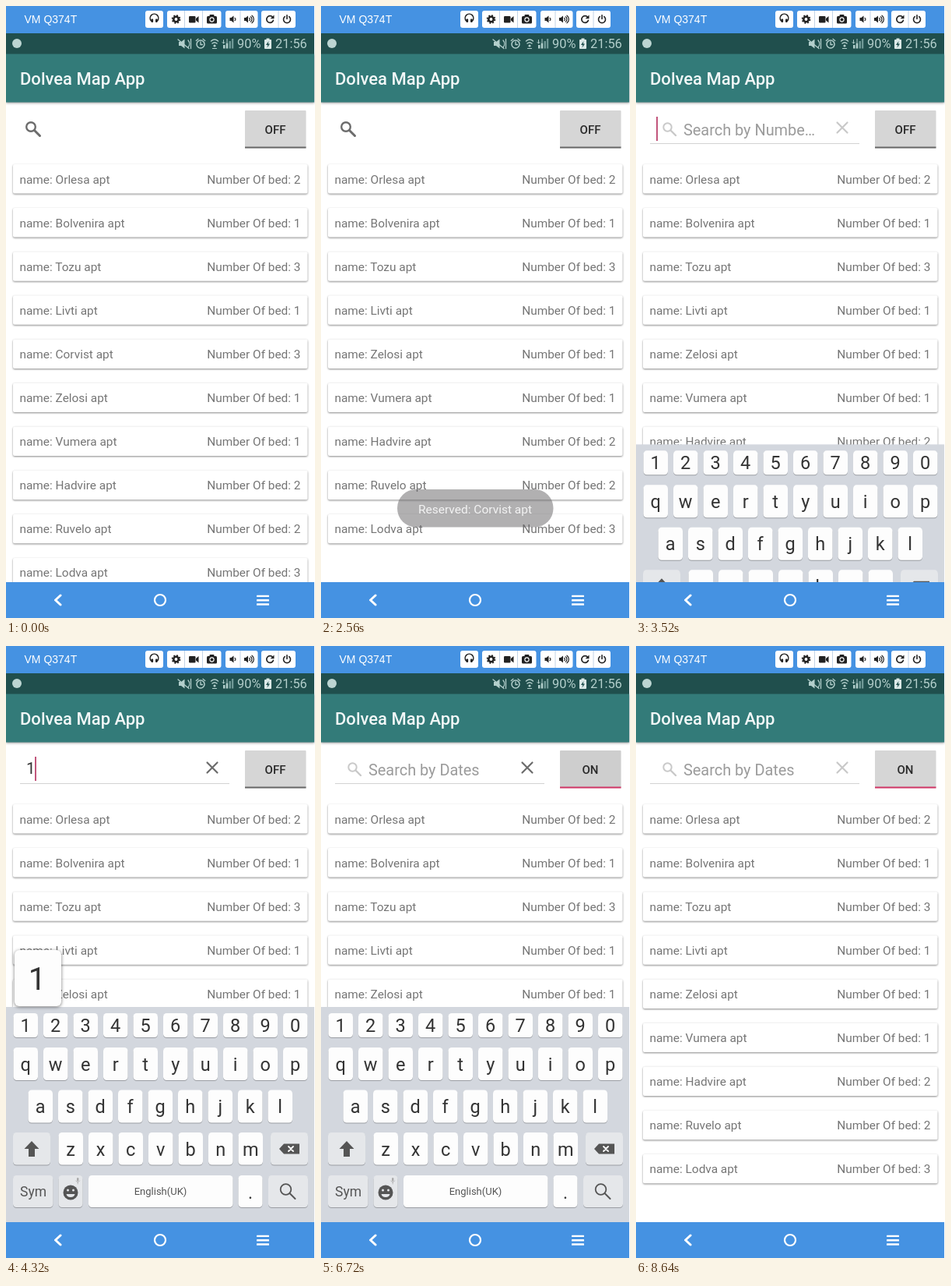
Recreate the animation shown at these times as an HTML page. Size 397 by 785 pixels, loop 9120 ms.

```html
<!DOCTYPE html>
<html lang="en">
<head>
<meta charset="utf-8">
<title>Apartment list</title>
<style>
html, body { margin: 0; width: 100%; height: 100%; overflow: hidden; background: #fff; }
svg { display: block; width: 100vw; height: 100vh; font-family: Roboto, sans-serif; }
.card { fill: #fff; filter: drop-shadow(0 1px 1.2px #0007); }
.row { fill: #757575; font-size: 15.4px; }
.key { filter: drop-shadow(0 1px .6px #0004); }
.line { fill: none; stroke-linecap: round; stroke-linejoin: round; }
.mid { text-anchor: middle; }
</style>
</head>
<body>
<svg id="stage" viewBox="0 0 397 785" xmlns="http://www.w3.org/2000/svg"></svg>
<script>
const LOOP = 9120, STEP = 160, PITCH = 56.1, GONE = 4, BOARD = 276;
const flats = [['Orlesa', 2], ['Bolvenira', 1], ['Tozu', 3], ['Livti', 1], ['Corvist', 3],
  ['Zelosi', 1], ['Vumera', 1], ['Hadvire', 2], ['Ruvelo', 2], ['Lodva', 3]];

const rect = (x, y, w, h, fill, r = 0, more = '') =>
  `<rect x="${x}" y="${y}" width="${w}" height="${h}" rx="${r}" fill="${fill}" ${more}/>`;
const text = (x, y, size, fill, str, more = '') =>
  `<text x="${x}" y="${y}" font-size="${size}" fill="${fill}" ${more}>${str}</text>`;
const line = (d, color, w, more = '') =>
  `<path class="line" d="${d}" stroke="${color}" stroke-width="${w}" ${more}/>`;
const shape = (d, fill) => `<path d="${d}" fill="${fill}"/>`;
const ring = (x, y, r, color, w, more = '') =>
  `<circle cx="${x}" cy="${y}" r="${r}" fill="none" stroke="${color}" stroke-width="${w}" ${more}/>`;
const dot = (x, y, r, fill) => `<circle cx="${x}" cy="${y}" r="${r}" fill="${fill}"/>`;
const group = (id, body) => `<g id="${id}">${body}</g>`;
const MID = 'class="mid"';

function cards() {
  return flats.map(([name, beds], i) => group('row' + i,
    `<rect class="card" x="9" y="203" width="378.5" height="37.5" rx="2"/>` +
    `<text class="row" x="17.5" y="227.5">name: ${name} apt</text>` +
    `<text class="row" x="378.5" y="227.5" text-anchor="end">Number Of bed: ${beds}</text>`)).join('');
}

function search() {
  return group('closed', ring(32, 155, 5.8, '#6c6c6c', 2.4) + line('M37 160L43.5 166.5', '#6c6c6c', 3)) +
    group('open',
      rect(18, 176, 269, 1, '#d2d2d2') +
      group('hint', ring(40.5, 155.5, 5.2, '#c9c9c9', 2) + line('M45 160L51 166', '#c9c9c9', 2.4) +
        text(61, 165.5, 19.9, '#9b9b9b', '', 'id="hintText"')) +
      text(26, 164, 20.5, '#333', '1', 'id="query"') +
      line('M258.5 149.5L271.5 162.5M271.5 149.5L258.5 162.5', '#c9c9c9', 2.2, 'id="cross"') +
      rect(26, 142, 2, 31, '#c2567c', 0, 'id="cursor"')) +
    rect(307, 134, 78.5, 48, '#d6d6d6', 1, 'id="button"') +
    rect(307, 180.5, 78.5, 2, '#666', 0, 'id="mark"') +
    text(346, 164, 15, '#2a2a2a', 'OFF', 'id="label" class="mid" font-weight="500"');
}

function keyboard() {
  const key = (x, y, w, h, fill = '#fdfdfd') => rect(x, y, w, h, fill, 4.5, 'class="key"');
  const rows = [['1234567890', 9.5, 471, 31, 495], ['qwertyuiop', 9.5, 515, 42, 545],
    ['asdfghjkl', 28.5, 569.5, 42, 599], ['zxcvbnm', 67.5, 624, 41.5, 653.5]];
  let out = rect(0, 463, 396, BOARD, '#d3d7de');
  for (const [chars, x, y, h, base] of rows)
    [...chars].forEach((c, i) => {
      const left = x + i * 38.5;
      out += key(left, y, 31.5, h) + text(left + 15.7, base, 23.5, '#333', c, MID);
    });
  const grey = '#e5e7ea', ink = '#555';
  out += key(9, 624, 48, 41.5, grey) + key(340, 624, 48, 41.5, grey) +
    key(9, 679, 51.5, 41, grey) + key(67.5, 679, 31, 41, grey) +
    key(106, 679, 185.5, 41) + key(298.5, 679, 31, 41) + key(337, 679, 51, 41, grey);
  out += shape('M33 635L42.5 645H37V655H29V645H23.5Z', ink) +
    shape('M351 645L357 638.5H377V651.5H357Z', ink) + line('M363 642L369 648M369 642L363 648', '#fff', 1.8);
  out += text(35, 706, 17.5, ink, 'Sym', MID) + text(198.5, 704, 13, ink, 'English(UK)', MID) +
    text(314, 709, 23, '#333', '.', MID);
  out += dot(83, 701, 9.5, ink) + dot(79.5, 698, 1.5, grey) + dot(86.5, 698, 1.5, grey) +
    shape('M77.5 703H88.5A5.6 5 0 0 1 77.5 703Z', grey) +
    rect(91, 682, 2.4, 4.5, '#aaa', 1.2) + line('M89.8 686Q92.2 689.5 94.6 686M92.2 688V690', '#aaa', .8);
  return out + ring(359.5, 697, 6.8, ink, 1.8) + line('M364.5 702L371.5 709', ink, 2);
}

function deviceBar() {
  const ink = '#222';
  let out = rect(0, 0, 396, 35, '#4592e2') +
    text(23.5, 22, 14, '#fff', 'VM Q374T', 'font-family="Liberation Sans, Arial, sans-serif"');
  for (const [x, w] of [[179, 23], [207, 69.5], [282, 41.5], [328, 44]]) out += rect(x, 6, w, 22, '#fff', 3);
  for (const x of [229, 252, 300.5, 349.5]) out += rect(x, 6, 1, 22, '#c4d4e6');
  // headset, gear, video, camera
  out += line('M186.5 19A5.3 5.3 0 1 1 194.5 19', ink, 1.6) + rect(186.5, 16.5, 2.6, 4.5, ink, 1) +
    rect(192, 16.5, 2.6, 4.5, ink, 1) +
    ring(218.5, 17, 3.2, ink, 2.6) + ring(218.5, 17, 4.9, ink, 1.8, 'stroke-dasharray="1.95 1.9"') +
    rect(235, 13, 8.5, 8.5, ink, 1.2) + shape('M244 16L247.5 13V21.5L244 18.5Z', ink) +
    rect(258, 13, 13, 9.5, ink, 1.5) + rect(261.5, 11, 6, 4, ink, 1) + ring(264.5, 17.5, 2.6, '#fff', 1.1);
  // volume, reload, power
  for (const x of [287.5, 306]) out += shape(`M${x} 15H${x + 2}L${x + 5} 12.5V21.5L${x + 2} 19H${x}Z`, ink) +
    line(`M${x + 6.6} 15.4A2 2 0 0 1 ${x + 6.6} 18.6`, ink, 1.2);
  return out + line('M314.3 13.8A4 4 0 0 1 314.3 20.2M316 12.2A6 6 0 0 1 316 21.8', ink, 1.2) +
    line('M342.6 14.2A4.4 4.4 0 1 0 343.4 18.5', ink, 1.7) + shape('M344.5 11.5V16.3H339.6Z', ink) +
    line('M358.2 13.6A4.5 4.5 0 1 0 363.8 13.6M361 11.8V16.5', ink, 1.6);
}

function appBar() {
  const pale = '#b3cfcc';
  return rect(0, 61, 396, 62.5, '#337b79', 0, 'style="filter:drop-shadow(0 1.5px 1.5px #0006)"') +
    rect(0, 35, 396, 26.5, '#204f4d') + dot(14, 48, 6, '#bcd5d2') +
    text(18, 101, 22, '#f2f7f7', 'Dolvea Map App', 'font-weight="500"') +
    // muted, alarm, wifi, signal, battery
    shape('M222 46H225L229.5 42.5V54.5L225 51H222Z', pale) +
    line('M221 43L235 54.5M234 44A7 7 0 0 1 234 53M237.5 42.5V54.5', pale, 1.3) +
    ring(250, 49, 5, pale, 1.5) + line('M250 46V49.5H252.5M244.3 44.5L247 42.3M255.7 44.5L253 42.3', pale, 1.3) +
    line('M263.5 45Q268 41 272.5 45M265 48Q268 45.3 271 48', pale, 1.4) + dot(268, 51, 1.6, pale) +
    line('M265.5 54.5H270.5', pale, 1.2) +
    shape('M279 54.5V50H281.5V54.5ZM282.7 54.5V47.5H285.2V54.5Z', pale) +
    shape('M286.5 54.5V45H289V54.5ZM290 54.5V42H292.3V54.5Z', '#6f9896') +
    line('M279.5 43.5V48M278 46.5L279.5 48L281 46.5M284 47V42.5', pale, 1) +
    rect(332, 43, 9, 12, '#dbe9e7', 1) + rect(334.5, 41.5, 4, 2, '#dbe9e7') +
    shape('M337.5 45L334 50H336.3L335.5 53.5L339 48.5H336.8Z', '#204f4d') +
    text(297, 54, 16.4, pale, '90%') + text(346, 54, 16.4, pale, '21:56');
}

function navBar() {
  return rect(0, 739, 396, 46, '#4592e2') + line('M70 756L63.5 762L70 768', '#fff', 3) +
    ring(198, 762, 7, '#fff', 2.2) + [755.7, 761, 766.3].map(y => rect(322, y, 16, 2.4, '#fff', .5)).join('');
}

document.getElementById('stage').innerHTML =
  rect(0, 0, 397, 785, '#fff') + cards() + search() + group('board', keyboard()) +
  group('popup', rect(11, 390, 60, 72, '#fdfdfd', 6, 'style="filter:drop-shadow(0 1px 2px #0008)"') +
    text(40, 441, 40, '#333', '1', MID)) +
  group('toast', rect(98, 620, 200.5, 48.5, '#656366', 24) +
    text(198, 651, 15.5, '#e8e8e8', `Reserved: ${flats[GONE][0]} apt`, MID)) +
  navBar() + appBar() + deviceBar();

const $ = id => document.getElementById(id);
const set = (id, name, value) => $(id).setAttribute(name, value);
const show = (id, on) => set(id, 'opacity', +on);
const ramp = (t, a, b) => Math.min(1, Math.max(0, (t - a) / (b - a)));
const within = (t, a, b) => t >= a && t < b;

function drawRows(t) {
  const filtered = within(t, 5760, 6720);
  const p = ramp(t, 880, 1240), slide = p * p * (3 - 2 * p);
  let slot = 0;
  flats.forEach(([, beds], i) => {
    let place = i > GONE ? i - slide : i, alpha = i === GONE ? 1 - ramp(t, 720, 960) : 1;
    if (filtered) {
      alpha = +(beds === 1);
      if (alpha) place = slot++;
    }
    set('row' + i, 'transform', `translate(0 ${place * PITCH})`);
    show('row' + i, alpha);
  });
}

function draw(t) {
  drawRows(t);
  show('toast', ramp(t, 960, 1280) * (1 - ramp(t, 2240, 2880)));

  const open = t >= 3200, typed = within(t, 4320, 6720), on = t >= 6400;
  show('closed', !open);
  show('open', open);
  show('hint', !typed);
  show('query', typed);
  $('hintText').textContent = on ? 'Search by Dates' : 'Search by Numbe…';
  set('cross', 'stroke', within(t, 4320, 6880) ? '#6c6c6c' : '#c9c9c9');

  // the blink restarts with each edit
  const edit = t >= 6880 ? 6880 : t >= 4320 ? 4320 : 3200;
  show('cursor', t < 8320 && Math.floor((t - edit) / 480) % 2 === 0);
  set('cursor', 'x', typed ? 37 : 26);

  $('label').textContent = on ? 'ON' : 'OFF';
  set('mark', 'fill', on ? '#cf3565' : '#666');
  set('button', 'fill', within(t, 6240, 7040) ? '#cecece' : '#d6d6d6');

  const rise = (1 - ramp(t, 3440, 3640)) ** 2, fall = ramp(t, 8280, 8600) ** 2;
  set('board', 'transform', `translate(0 ${BOARD * Math.max(rise, fall)})`);
  show('popup', within(t, 4160, 4480));
}

const start = performance.now();
function tick() {
  const t = (performance.now() - start) % LOOP;
  draw(Math.floor(t / STEP) * STEP);
  requestAnimationFrame(tick);
}
tick();
</script>
</body>
</html>
```
